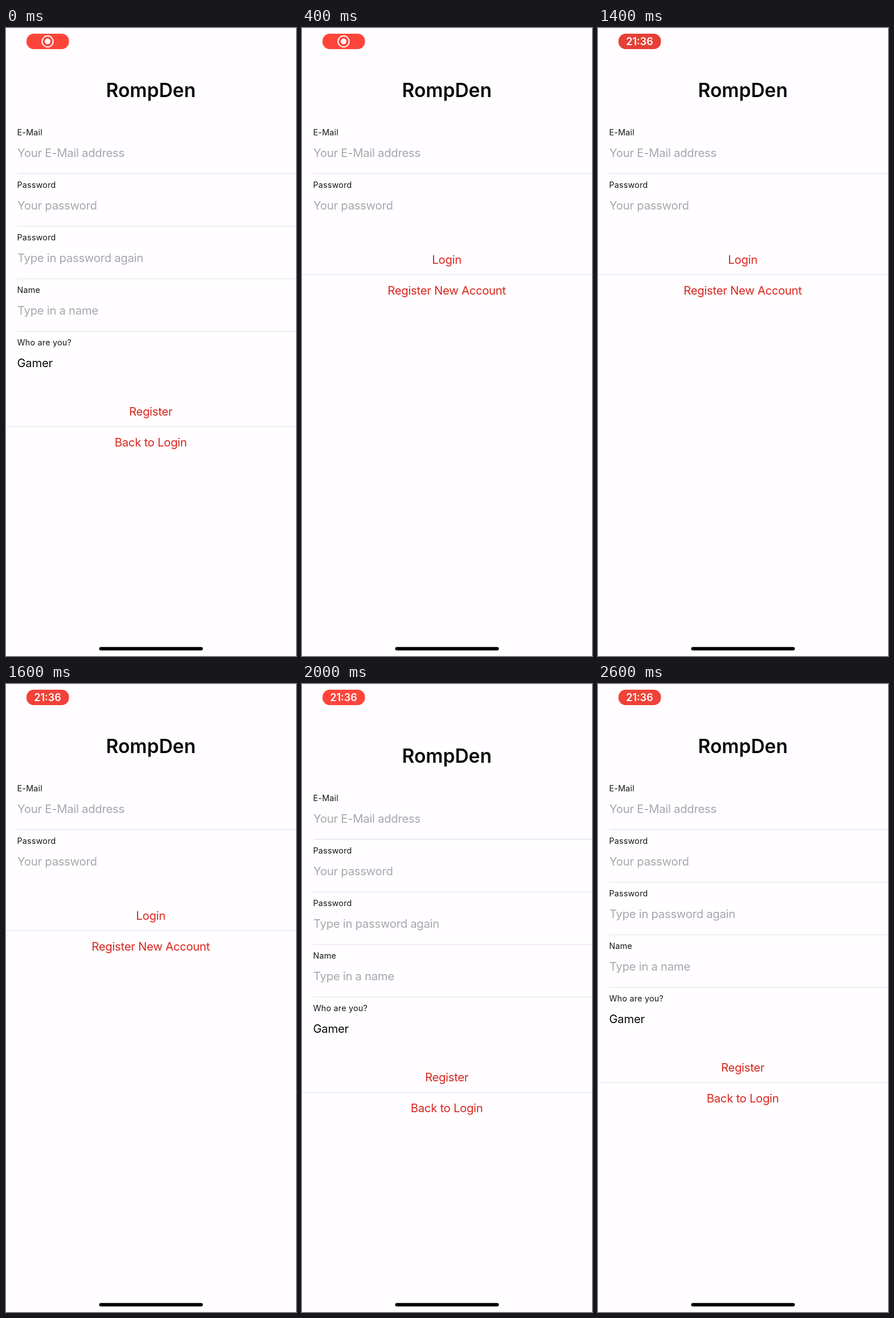
Animation, 509 px wide and 1100 px high, one loop 2800 ms. Source, as an HTML page:

```html
<!DOCTYPE html>
<html lang="en">
<head>
<meta charset="utf-8">
<title>Sign-in screens</title>
<style>
  html, body { margin: 0; width: 100%; height: 100%; overflow: hidden; background: #fffdff; }
  svg { display: block; width: 509px; height: 1100px; font-family: Inter, Roboto, sans-serif; }

  .page { fill: #fffdff; }
  .title { font-size: 33.5px; font-weight: 600; fill: #0a090b; text-anchor: middle; }
  .label { font-size: 14.3px; letter-spacing: .23px; fill: #161518; }
  .hint, .value, .button { font-size: 20.3px; letter-spacing: -.28px; }
  .hint { fill: #a9a7ac; }
  .value { fill: #0a090b; }
  .button { fill: #d8261d; text-anchor: middle; }
  .rule { stroke: #e8e6eb; stroke-width: 1.3; }
  .time { font-size: 18px; font-weight: 600; fill: #fff; text-anchor: middle; }

  /* every change is a hard 200 ms step */
  .sheet, .pressed, .pill, .rec, .time { animation: 2.8s step-end infinite; }
  .sheet { animation-name: slide; }
  .pressed { fill: #fcf8fb; animation-name: press; }
  .pill { animation-name: pulse; }
  .rec { animation-name: rec; }
  .time { animation-name: time; }

  @keyframes slide {
    0% { transform: translateY(0); }
    7.14% { transform: translateY(354px); }
    14.28% { transform: translateY(1100px); }
    64.28% { transform: translateY(454px); }
    71.42% { transform: translateY(17px); }
    78.57%, 100% { transform: translateY(0); }
  }
  @keyframes press {
    0% { opacity: 0; }
    64.28% { opacity: 1; }
    71.42%, 100% { opacity: 0; }
  }
  @keyframes pulse {
    0% { fill: #ff453b; }
    21.42% { fill: #fa443a; }
    28.57% { fill: #ec4037; }
    35.71% { fill: #dc3c34; }
    49.99% { fill: #e63f36; }
    57.14% { fill: #f24239; }
    64.28% { fill: #ff453b; }
    85.71% { fill: #fb443a; }
    92.85%, 100% { fill: #f04238; }
  }
  @keyframes rec {
    0% { opacity: 1; }
    49.99%, 100% { opacity: 0; }
  }
  @keyframes time {
    0% { opacity: 0; }
    49.99%, 100% { opacity: 1; }
  }
</style>
</head>
<body>
<svg viewBox="0 0 509 1100">
  <g>
    <rect class="page" width="509" height="1100"/>
    <rect class="pressed" y="432" width="509" height="54"/>
    <text class="title" x="254.2" y="120.5">RompDen</text>
    <text class="label" x="19.5" y="188">E-Mail</text>
    <text class="hint" x="20" y="226">Your E-Mail address</text>
    <path class="rule" d="M20 255H509"/>
    <text class="label" x="19.5" y="280">Password</text>
    <text class="hint" x="20" y="318">Your password</text>
    <text class="button" x="254.1" y="412.5">Login</text>
    <path class="rule" d="M0 432H509"/>
    <text class="button" x="254.1" y="466.5">Register New Account</text>
  </g>

  <g class="sheet">
    <rect class="page" width="509" height="1100"/>
    <text class="title" x="254.2" y="120.5">RompDen</text>
    <text class="label" x="19.5" y="188">E-Mail</text>
    <text class="hint" x="20" y="226">Your E-Mail address</text>
    <text class="label" x="19.5" y="280">Password</text>
    <text class="hint" x="20" y="318">Your password</text>
    <text class="label" x="19.5" y="372">Password</text>
    <text class="hint" x="20" y="410">Type in password again</text>
    <text class="label" x="19.5" y="464">Name</text>
    <text class="hint" x="20" y="502">Type in a name</text>
    <text class="label" x="19.5" y="556">Who are you?</text>
    <text class="value" x="19.5" y="594">Gamer</text>
    <path class="rule" d="M20 255H509M20 347.2H509M20 439.3H509M20 531.4H509M0 698.3H509"/>
    <text class="button" x="254.1" y="679">Register</text>
    <text class="button" x="254.1" y="733">Back to Login</text>
  </g>

  <rect class="pill" x="36" y="10" width="74.5" height="27" rx="12.5"/>
  <g class="rec" fill="#fff">
    <circle cx="73" cy="23.5" r="9.7" fill="none" stroke="#fff" stroke-width="2"/>
    <circle cx="73" cy="23.5" r="5"/>
  </g>
  <text class="time" x="73" y="30">21:36</text>
  <rect x="163.5" y="1084.3" width="182" height="5.9" rx="2.95"/>
</svg>
</body>
</html>
```
